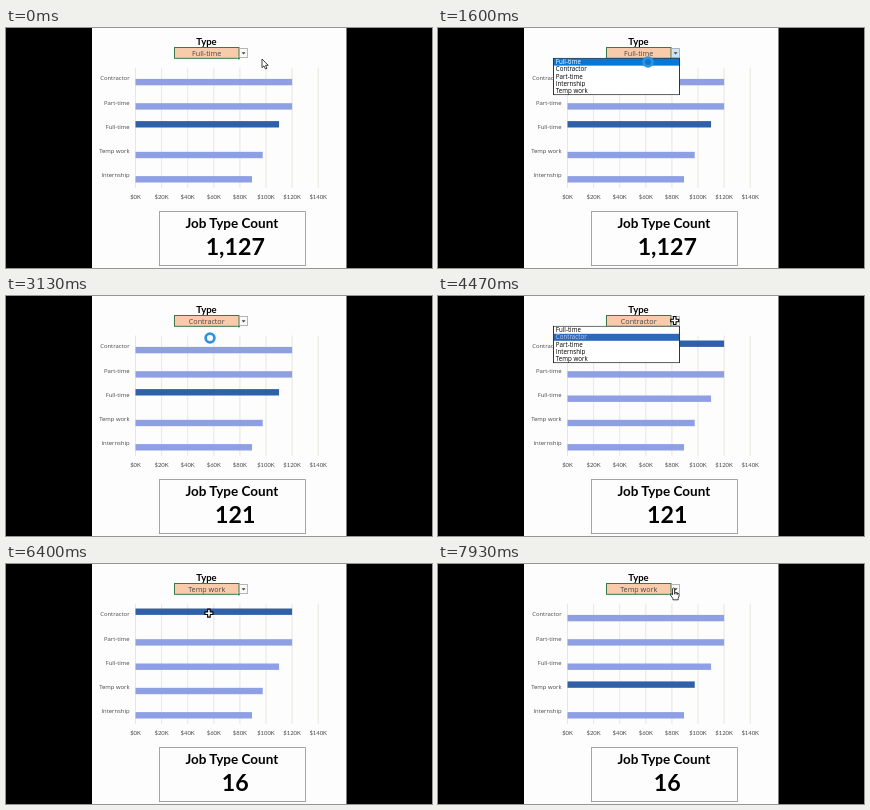
Recreate the animation shown at these times as an HTML page. Size 426 by 240 pixels, loop 8000 ms.

```html
<!DOCTYPE html>
<html lang="en">
<head>
<meta charset="utf-8">
<title>Job type dashboard</title>
<style>
html, body { margin: 0; width: 100%; height: 100%; overflow: hidden; background: #000; }
svg { display: block; width: 100%; height: 100%; }
text { font-family: Lato, "Open Sans", sans-serif; }
.axis { font: 5.9px "Open Sans", sans-serif; fill: #484848; }
.tick { font-size: 5.9px; fill: #484848; text-anchor: middle; }
.bold { font-weight: 700; fill: #000; text-anchor: middle; }
.cell { font: 7.2px "Open Sans", sans-serif; fill: #4d453f; text-anchor: middle; }
.item { font: 6.2px "Open Sans", sans-serif; }
</style>
</head>
<body>
<svg id="stage" viewBox="0 0 426 240">
  <rect width="426" height="240"/>
  <rect x="86" width="254.5" height="240" fill="#fdfdfd"/>
  <text class="bold" x="200.5" y="16.6" font-size="9.5">Type</text>
  <g id="chart"></g>

  <rect x="168.5" y="19.5" width="64.5" height="10.8" fill="#f8cbad" stroke="#397849"/>
  <rect x="231.6" y="29" width="2.4" height="2.4" fill="#217346" stroke="#fff" stroke-width=".4"/>
  <text id="cell" class="cell" x="200.7" y="27.9"></text>
  <rect id="button" x="233.6" y="20.6" width="8" height="8.8" stroke="#a2a6aa" stroke-width=".8"/>
  <path d="M235.6 24.2h4l-2 2.2z" fill="#444"/>

  <rect x="153.5" y="183.6" width="146" height="54" fill="#fdfdfd" stroke="#8f8aa6" stroke-width=".8"/>
  <text class="bold" x="225.8" y="200.3" font-size="13.5">Job Type Count</text>
  <text id="count" class="bold" x="229.3" y="227.3" font-size="23.2"></text>

  <g id="list"><rect x="115.5" y="30.4" width="126" height="36.2" fill="#fff" stroke="#222" stroke-width=".9"/></g>

  <g id="cursor" stroke-linejoin="round">
    <path id="arrow" d="M0 0V8.6L2 6.9 3.5 10 5 9.3 3.6 6.3H6.2Z" fill="#fff" stroke="#111" stroke-width=".8"/>
    <path id="plus" d="M-1.3-4H1.3V-1.3H4V1.3H1.3V4H-1.3V1.3H-4V-1.3H-1.3Z" fill="#fff" stroke="#000" stroke-width="1.1"/>
    <circle id="busy" r="4.4" fill="none" stroke="#3193dc" stroke-width="2.7"/>
    <path id="hand" d="M-1 .6Q0-.6 1 .6V4.2L2.4 4.4 3.8 4.9 5.2 5.6Q5.8 6 5.6 8L4.7 10.2V11.8H-.6V10.4L-3.2 6.9Q-3.4 5.6-2.2 5.8L-1 7ZM1 4.2V6.4M2.6 4.6V6.5M4.1 5.1V6.8" fill="#fff" stroke="#111" stroke-width=".8"/>
  </g>
</svg>
<script>
const LOOP = 8000;
const $ = id => document.getElementById(id);

function add(parent, tag, attrs, text = "") {
  const el = document.createElementNS("http://www.w3.org/2000/svg", tag);
  for (const key in attrs) el.setAttribute(key, attrs[key]);
  el.textContent = text;
  return parent.appendChild(el);
}

// Chart: the chosen category moves up by one bar height and turns dark.
const X0 = 129.5, TICK = 26.1, SLOT = 24.3, BAR = 6.4;
const jobs = [["Contractor", 120], ["Part-time", 120], ["Full-time", 110], ["Temp work", 97.5], ["Internship", 89.3]];
for (let i = 0; i <= 7; i++) {
  const x = X0 + i * TICK;
  add($("chart"), "path", { d: `M${x} 39.5V160`, stroke: "#e2e1d6", "stroke-width": .8 });
  add($("chart"), "text", { class: "tick", x, y: 170.6 }, `$${i * 20}K`);
}
const bars = jobs.map(([name, pay], i) => {
  add($("chart"), "text", { class: "axis", x: 123.6, y: 52.2 + i * SLOT, "text-anchor": "end" }, name);
  return add($("chart"), "rect", { x: X0, width: pay / 20 * TICK, height: BAR });
});

// Dropdown list
const ROW = 7.1;
const items = ["Full-time", "Contractor", "Part-time", "Internship", "Temp work"].map((name, i) => {
  const y = 30.7 + i * ROW;
  return {
    back: add($("list"), "rect", { x: 116, y, width: 125, height: ROW }),
    label: add($("list"), "text", { class: "item", x: 117.8, y: y + 5.6 }, name)
  };
});

// Each entry holds from its time until the next one.
const cellSteps = [[0, "Full-time"], [2600, "Contractor"], [6000, "Temp work"]];
const countSteps = [[0, "1,127"], [2900, "121"], [6300, "16"]];
const chartSteps = [[0, "Full-time"], [3400, "Contractor"], [6500, "Temp work"]];
const listSteps = [[0, false], [1000, true], [2600, false], [4300, true], [6000, false]];
const hoverSteps = [[0, 0], [2000, 1], [4950, 2], [5150, 3], [5350, 4]];
const cursorSteps = [[0, "arrow"], [800, "hand"], [1200, "busy"], [3500, "plus"], [6600, "hand"]];

// Pointer path: time, x, y
const path = [
  [0, 256, 31], [700, 238, 25], [1050, 238, 25], [1500, 210, 34], [1750, 210, 34],
  [2250, 204, 42], [3400, 204, 42], [4050, 236.7, 24.5], [4600, 236.7, 24.5], [5450, 177, 63],
  [6000, 177, 63], [6950, 244.5, 27], [7350, 244.5, 27], [7850, 235.5, 24], [8000, 235.5, 24]
];

const at = (steps, t) => steps.filter(s => s[0] <= t).pop()[1];

function pointer(t) {
  const i = path.findIndex(p => p[0] > t);
  const [ta, xa, ya] = path[i - 1], [tb, xb, yb] = path[i];
  const u = (t - ta) / (tb - ta), k = u * u * (3 - 2 * u);
  return [xa + (xb - xa) * k, ya + (yb - ya) * k];
}

function render(t) {
  $("cell").textContent = at(cellSteps, t);
  $("count").textContent = at(countSteps, t);

  const chosen = at(chartSteps, t);
  bars.forEach((bar, i) => {
    const on = jobs[i][0] === chosen;
    bar.setAttribute("y", 50.9 + i * SLOT - (on ? BAR : 0));
    bar.setAttribute("fill", on ? "#3060a8" : "#8f9fe4");
  });

  const open = at(listSteps, t), hover = at(hoverSteps, t);
  const resting = t > 4300 && t < 4750;
  $("list").style.display = open ? "" : "none";
  $("button").setAttribute("fill", open && !resting ? "#cfe4f5" : "#fafafa");
  items.forEach(({ back, label }, i) => {
    const on = i === hover;
    back.setAttribute("fill", !on ? "#fff" : resting ? "#2f68b8" : "#0878d8");
    label.setAttribute("fill", !on ? "#000" : resting ? "#b9cdec" : "#fff");
  });

  const shape = at(cursorSteps, t);
  for (const id of ["arrow", "plus", "busy", "hand"]) $(id).style.display = id === shape ? "" : "none";
  $("cursor").setAttribute("transform", `translate(${pointer(t)})`);
}

function frame() {
  render(performance.now() % LOOP);
  requestAnimationFrame(frame);
}
frame();
</script>
</body>
</html>
```
